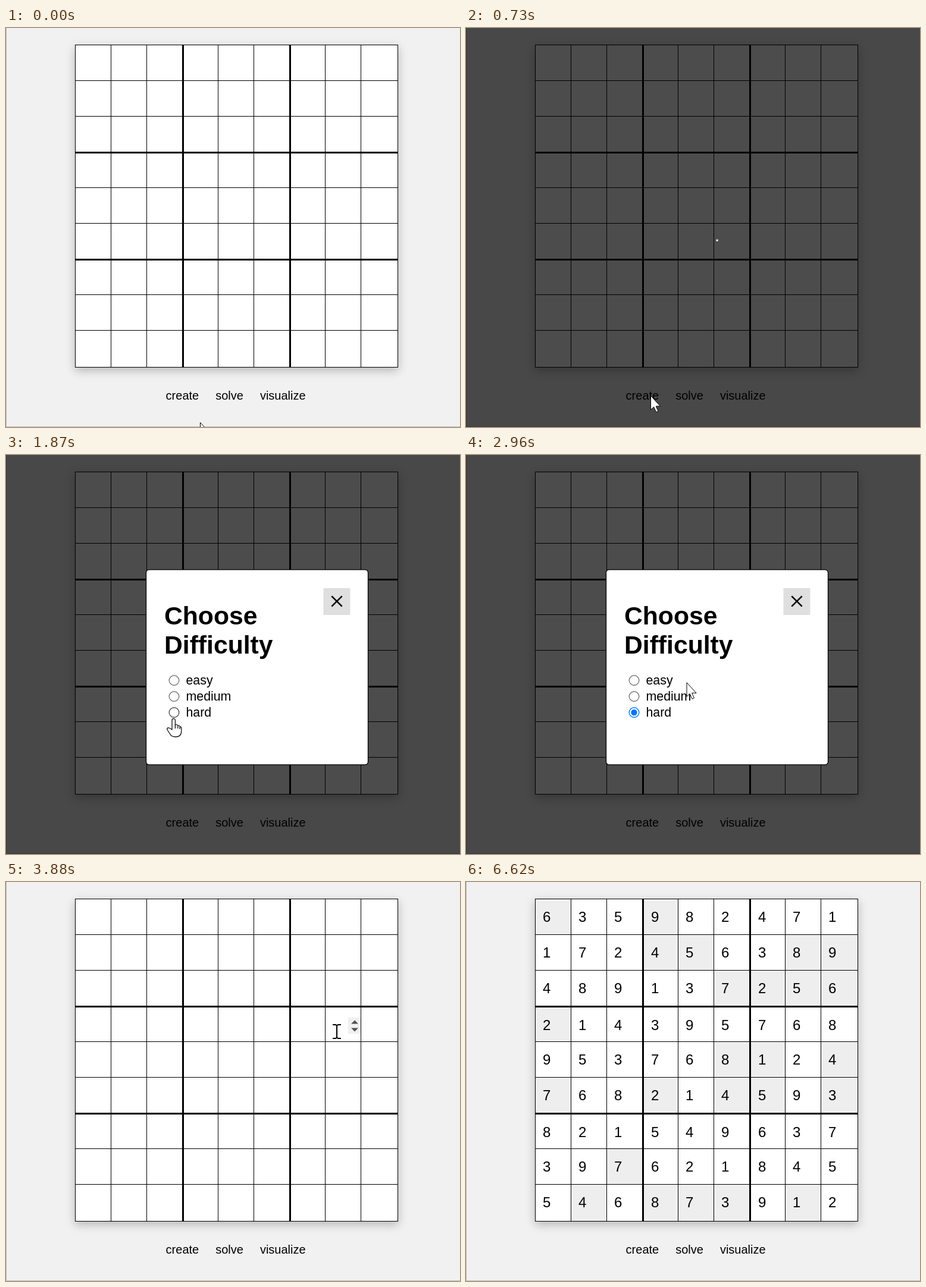
These frames come from a looping animation (763x671 px, 7.49 s). An HTML page:

```html
<!DOCTYPE html>
<html lang="en">
<head>
<meta charset="utf-8">
<title>Sudoku</title>
<style>
  html, body { margin: 0; width: 100%; height: 100%; overflow: hidden; background: #f1f1f1; }
  #board { position: absolute; left: 116px; top: 28px; width: 543px; height: 543px; box-shadow: 0 5px 15px rgba(0, 0, 0, .25); }
  svg { position: absolute; left: 0; top: 0; }
  text { font-family: "Liberation Sans", Arial, sans-serif; }
  #ibeam { mix-blend-mode: difference; }
</style>
</head>
<body>
<div id="board"></div>
<svg width="763" height="671" viewBox="0 0 763 671">
  <path d="M.5 0V670.5H763" fill="none" stroke="#b8b8b8"/>
  <rect x="116" y="28" width="543" height="543" fill="#fff"/>
  <g id="shades" fill="#eee"></g>
  <g id="lines"></g>
  <g id="givens" font-size="24"></g>
  <g id="answers" font-size="24"></g>
  <g id="spinner">
    <rect width="21" height="27" fill="#f0f0f0"/>
    <path d="M5 10.5L11 4.5L17 10.5ZM5 17.5H17L11 23.5Z" fill="#505050"/>
  </g>
  <g id="nav" font-size="20"></g>
  <rect id="overlay" width="763" height="671" opacity=".7"/>
  <g id="modal">
    <rect x="235.5" y="192.9" width="373" height="328" rx="5" fill="#fff" stroke="#000" stroke-width="1.3"/>
    <g font-size="42.67" font-weight="bold">
      <text x="266" y="285">Choose</text>
      <text x="266" y="334">Difficulty</text>
    </g>
    <g id="options" font-size="21.33"></g>
    <rect id="close" x="533.5" y="224" width="45" height="45"/>
    <path d="M547.3 237.3L564.7 254.7M564.7 237.3L547.3 254.7" stroke="#000" stroke-width="2.6"/>
  </g>
  <path id="arrow" d="M.5 .5V24L5.6 19.2L9.6 28L13 26.5L9.2 18H16.5Z" fill="#fff" stroke="#000"/>
  <g id="hand" stroke="#111" stroke-width="1.3" stroke-linejoin="round">
    <path d="M-3 19V3A2.7 2.7 0 0 1 2.4 3V11Q5.5 9.5 6.8 12Q9.5 11.5 10.2 13.6Q12.8 13.6 12.8 17V21Q12.8 31 3 31Q-4 31 -6.5 26L-11.3 18.5Q-11.5 15.5 -8.5 15.8Q-6 16 -3 19Z" fill="#fff"/>
    <path d="M2.4 11V17M6.8 12.5V17M10.2 14V18" fill="none"/>
  </g>
  <path id="ibeam" d="M-7 -11H-2L0 -9.5L2 -11H7M0 -10V11M-7 12H-2L0 10.5L2 12H7" fill="none" stroke="#fff" stroke-width="2"/>
</svg>
<script>
const LOOP = 7490;
const $ = id => document.getElementById(id);

function add(parent, tag, attrs, text) {
  const el = document.createElementNS("http://www.w3.org/2000/svg", tag);
  for (const key in attrs) el.setAttribute(key, attrs[key]);
  if (text) el.textContent = text;
  return parent.appendChild(el);
}
const show = (el, on) => { el.style.display = on ? "" : "none"; };
const place = (el, x, y) => el.setAttribute("transform", `translate(${x} ${y})`);

// Board
const puzzle = ["6..9.....", "...45..89", ".....7256", "2........", ".....81.4",
                "7..2.45.3", ".........", "..7......", ".4.873.1."];
const solution = ["635982471", "172456389", "489137256", "214395768", "953768124",
                  "768214593", "821549637", "397621845", "546873912"];
const isThick = i => i === 3 || i === 6;
const lineAt = i => i * 60 + (i === 9 ? 2 : 0);
const cellAt = i => lineAt(i) + (isThick(i) ? 3 : 1);

for (let i = 0; i < 10; i++) {
  const size = isThick(i) ? 3 : 1;
  add($("lines"), "rect", { x: 116 + lineAt(i), y: 28, width: size, height: 543 });
  add($("lines"), "rect", { x: 116, y: 28 + lineAt(i), width: 543, height: size });
}
solution.forEach((row, r) => [...row].forEach((digit, c) => {
  const x = 116 + cellAt(c), y = 28 + cellAt(r);
  const given = puzzle[r][c] !== ".";
  if (given) {
    add($("shades"), "rect", { x, y, width: lineAt(c + 1) - cellAt(c), height: lineAt(r + 1) - cellAt(r) });
  }
  add($(given ? "givens" : "answers"), "text", { x: x + 12, y: y + 38 }, digit);
}));

// Buttons and options
const [createPill, solvePill] = [["create", 268.6, 55.6], ["solve", 352.2, 46.7], ["visualize", 426.9, 76.7]]
  .map(([label, x, w]) => {
    const pill = add($("nav"), "rect", { x: x - 10, y: 605, width: w + 20, height: 28, rx: 14 });
    show(pill, false);
    add($("nav"), "text", { x, y: 625 }, label);
    return pill;
  });

const radios = ["easy", "medium", "hard"].map((label, i) => {
  const cy = 379 + i * 27;
  add($("options"), "text", { x: 302.5, y: cy + 7 }, label);
  return add($("options"), "circle", { cx: 282.5, cy, r: 8.3, fill: "#fff", stroke: "#767676", "stroke-width": 1.4 });
});
const hard = radios[2];
const dot = add($("options"), "circle", { cx: 282.5, cy: 433, r: 5.2, fill: "#0075ff" });

// Pointer moves: start, end, steps, way points
const moves = [
  [60, 260, 4, [[326, 663], [310, 618]]],
  [1000, 1340, 6, [[310, 618], [304, 520]]],
  [1410, 1870, 8, [[304, 520], [292, 470], [284, 448], [282, 443]]],
  [2880, 3360, 8, [[282, 443], [400, 362], [525, 270], [556, 251]]],
  [4220, 4900, 11, [[556, 251], [455, 415], [398, 478], [378, 580], [375, 617]]],
  [6550, 6620, 2, [[375, 617], [416, 648], [440, 690]]]
];
const kinds = [[0, "arrow"], [190, "hand"], [730, "arrow"], [1800, "hand"], [2940, "arrow"], [3280, "hand"],
               [3820, "ibeam"], [4740, "arrow"], [4850, "hand"], [6550, "arrow"], [6620, "none"]];

function along(points, p) {
  const s = p * (points.length - 1);
  const i = Math.min(Math.floor(s), points.length - 2);
  return points[i].map((v, k) => v + (points[i + 1][k] - v) * (s - i));
}
function pointerAt(t) {
  const move = moves.filter(m => m[0] <= t).pop();
  if (!move) return moves[0][3][0];
  const [start, end, steps, points] = move;
  const step = Math.floor((t - start) / (end - start) * (steps - 1)) + 1;
  return along(points, Math.min(step / steps, 1));
}
const valueAt = (table, t) => table.filter(row => row[0] <= t).pop()[1];
const during = (t, a, b) => t >= a && t < b;
const smooth = p => p * p * (3 - 2 * p);

function drawPill(pill, t, from, to, downFrom, downTo) {
  show(pill, during(t, from, to));
  pill.setAttribute("fill", during(t, downFrom, downTo) ? "#cfcfcf" : "#dfdfdf");
}

function drawSpinner(t, x, y, filled) {
  const c = Math.floor((x - 116) / 60), r = Math.floor((y - 28) / 60);
  const on = during(t, 3880, 4740) && r < 9 && !(filled && puzzle[r][c] !== ".");
  show($("spinner"), on);
  if (on) place($("spinner"), 95 + lineAt(c + 1), 45 + cellAt(r));
}

function draw(t) {
  const filled = t >= 4220;
  show($("shades"), filled);
  show($("givens"), filled);
  show($("answers"), t >= 5680);

  drawPill(createPill, t, 190, 730, 600, 730);
  drawPill(solvePill, t, 4850, 6550, 5560, 5680);

  show($("overlay"), during(t, 730, 3880));
  const open = during(t, 730, 3880);
  show($("modal"), open);
  if (open) {
    const scale = smooth(Math.min((t - 720) / 200, 1));
    $("modal").setAttribute("transform", `translate(422 357) scale(${scale}) translate(-422 -357)`);
  }
  const checked = t >= 2550;
  show(dot, checked);
  hard.setAttribute("stroke", checked ? "#0075ff" : t >= 2420 ? "#8d8d8d" : t >= 1800 ? "#4f4f4f" : "#767676");
  $("close").setAttribute("fill", t >= 3690 ? "#c0c0c0" : t >= 3280 ? "#d0d0d0" : "#dfdfdf");

  const [x, y] = pointerAt(t);
  const kind = valueAt(kinds, t);
  for (const name of ["arrow", "hand", "ibeam"]) {
    show($(name), name === kind);
    place($(name), x, y);
  }
  drawSpinner(t, x, y, filled);
}

const begin = performance.now();
function tick() {
  draw((performance.now() - begin) % LOOP);
  requestAnimationFrame(tick);
}
tick();
</script>
</body>
</html>
```
